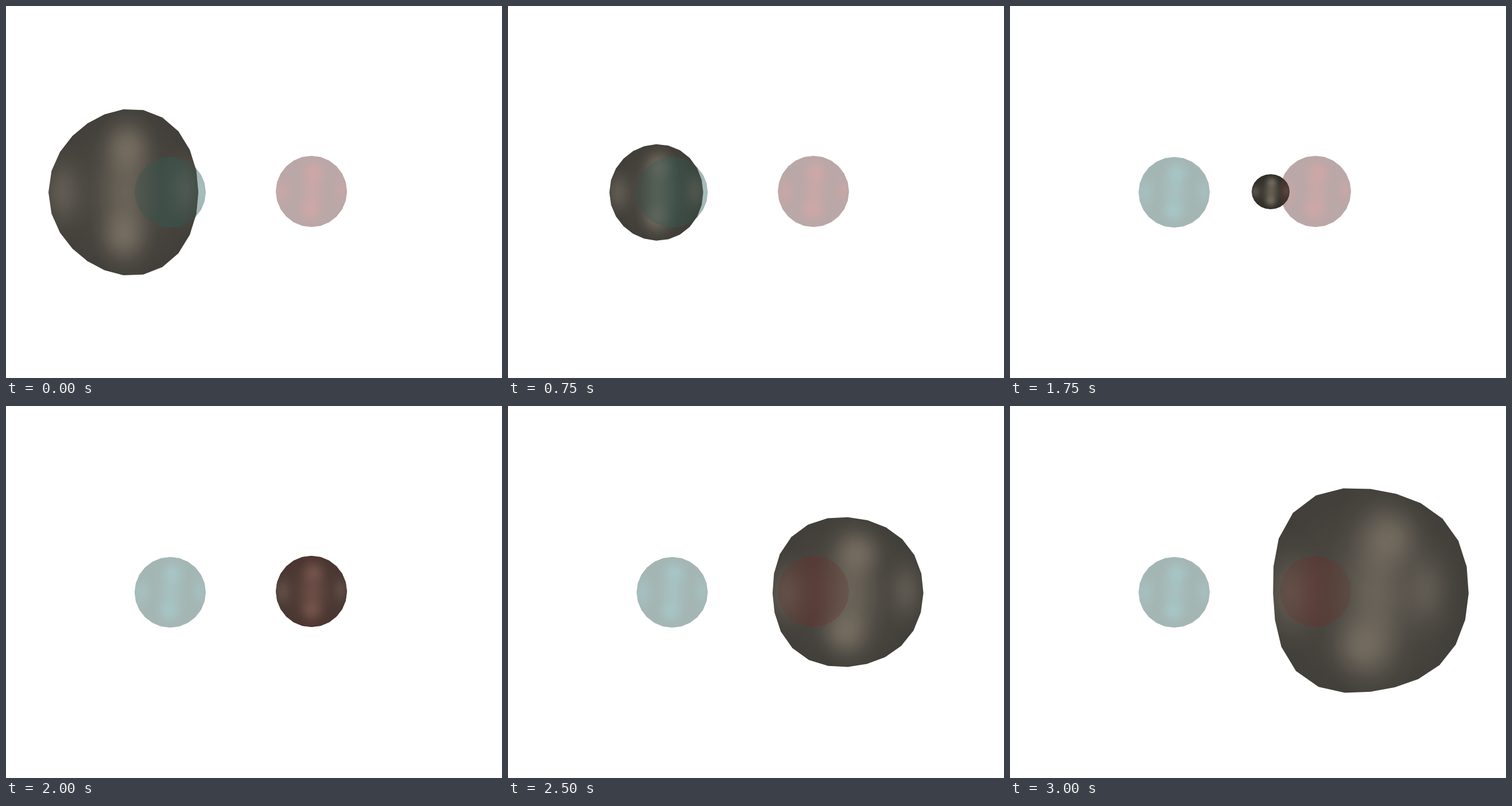
Recreate the animation shown at these times as an HTML page with a canvas. Size 864x648 px, loop 3.25 s.

```html
<!DOCTYPE html>
<html>
<head>
<meta charset="utf-8">
<style>
html, body { margin: 0; width: 100%; height: 100%; overflow: hidden; background: #fff; }
canvas { display: block; }
</style>
</head>
<body>
<canvas id="stage" width="864" height="648"></canvas>
<script>
const ctx = document.getElementById('stage').getContext('2d');
const STEP = 250, COUNT = 13, SIDES = 24;

// Key poses of the dark body: step, left, top, right, bottom
const keys = [
  [0, 74, 180, 335, 469],
  [2, 134, 219, 335, 431],
  [4, 224, 263, 348, 386],
  [5, 272, 284, 359, 365],
  [7, 421, 293, 487, 354],
  [8, 470, 261, 594, 385],
  [9, 462, 221, 676, 427],
  [10, 460, 195, 724, 457],
  [12, 456, 148, 800, 505]
];

const gap = i => keys[i + 1][0] - keys[i][0];
const slope = (i, c) => (keys[i + 1][c] - keys[i][c]) / gap(i);

function tangent(i, c) {
  if (i === 0) return slope(0, c);
  if (i === keys.length - 1) return slope(i - 1, c);
  const a = gap(i - 1), b = gap(i);
  return (slope(i - 1, c) * b + slope(i, c) * a) / (a + b);
}

// Smooth cubic through the key poses
function pose(n) {
  let i = 0;
  while (i < keys.length - 2 && n >= keys[i + 1][0]) i++;
  const h = gap(i), u = (n - keys[i][0]) / h, v = 1 - u;
  return [1, 2, 3, 4].map(c =>
    keys[i][c] * v * v * (1 + 2 * u) + keys[i + 1][c] * u * u * (3 - 2 * u) +
    h * u * v * (tangent(i, c) * v - tangent(i + 1, c) * u));
}

const toBox = ([l, t, r, b]) => ({ x: l, y: t, w: r - l, h: b - t });

// Polygon filling a box; radius(angle) bends it away from an ellipse
function outline(box, radius = () => 1) {
  return Array.from({ length: SIDES }, (_, i) => {
    const a = i * 2 * Math.PI / SIDES, r = radius(a) / 2;
    return [box.x + box.w * (.5 + r * Math.cos(a)), box.y + box.h * (.5 + r * Math.sin(a))];
  });
}

const early = n => Math.max(0, (4 - n) / 4);
const late = n => Math.max(0, (n - 8) / 4);

function bend(n) {
  const e = early(n), l = late(n);
  return a => 1 + .11 * e * Math.sin(a) ** 2 * Math.cos(a) +
    l * (.02 - .03 * Math.cos(4 * a) - .04 * Math.cos(a - .85) + .03 * Math.cos(3 * a));
}

const balls = [
  { box: toBox([224, 263, 348, 386]), edge: '164,182,180', glow: '168,203,204', tint: '46,95,88', rim: '48,78,71' },
  { box: toBox([470, 261, 594, 385]), edge: '186,167,167', glow: '214,167,168', tint: '110,46,42', rim: '98,56,52' }
];

function trace(pts) {
  ctx.beginPath();
  pts.forEach(p => ctx.lineTo(p[0], p[1]));
  ctx.closePath();
}

// Soft elliptical light, placed in fractions of a box
function spot(b, cx, cy, rx, ry, rgb, alpha) {
  ctx.save();
  ctx.translate(b.x + cx * b.w, b.y + cy * b.h);
  ctx.scale(rx * b.w, ry * b.h);
  const g = ctx.createRadialGradient(0, 0, 0, 0, 0, 1);
  [1, .82, .45, .14, 0].forEach((k, i) => g.addColorStop(i / 4, `rgba(${rgb},${alpha * k})`));
  ctx.fillStyle = g;
  ctx.fillRect(-1, -1, 2, 2);
  ctx.restore();
}

function lights(b, top, low, side, rgb, k) {
  spot(b, (top + low) / 2, .5, .25, .6, rgb, .5 * k);
  spot(b, top, .23, .22, .22, rgb, .6 * k);
  spot(b, low, .76, .22, .22, rgb, .6 * k);
  spot(b, .09, .5, .2, .3, rgb, .45 * k);
  spot(b, side, .48, .17, .28, rgb, .4 * k);
}

function drawBall({ box, edge, glow }) {
  ctx.save();
  trace(outline(box));
  ctx.fillStyle = `rgb(${edge})`;
  ctx.fill();
  ctx.clip();
  lights(box, .54, .48, .92, glow, 1);
  ctx.restore();
}

// The part of a ball seen through the dark body
function drawTint({ box, tint, rim }) {
  const g = ctx.createLinearGradient(box.x, 0, box.x + box.w, 0);
  g.addColorStop(0, `rgba(${rim},.3)`);
  g.addColorStop(.5, `rgba(${tint},.4)`);
  g.addColorStop(1, `rgba(${rim},.3)`);
  trace(outline(box));
  ctx.fillStyle = g;
  ctx.fill();
}

function drawBody(n) {
  const box = toBox(pose(n)), l = late(n);
  const big = Math.max(0, Math.min(1, (box.h - 60) / 120));
  const e = 44 + 20 * big;
  ctx.save();
  trace(outline(box, bend(n)));
  ctx.fillStyle = `rgb(${e},${e - 2},${e - 7})`;
  ctx.fill();
  ctx.clip();
  spot(box, .5, .5, .65, .65, '94,88,79', .55);
  lights(box, .53 + .07 * l, .5 - .04 * l, .92 - .14 * l * l, '142,131,116', .85);
  balls.forEach(drawTint);
  ctx.restore();
}

function draw(now) {
  ctx.fillStyle = '#fff';
  ctx.fillRect(0, 0, 864, 648);
  balls.forEach(drawBall);
  drawBody(Math.floor(now / STEP) % COUNT);
}

const start = performance.now();
function tick() {
  draw(performance.now() - start);
  requestAnimationFrame(tick);
}
tick();
</script>
</body>
</html>
```
